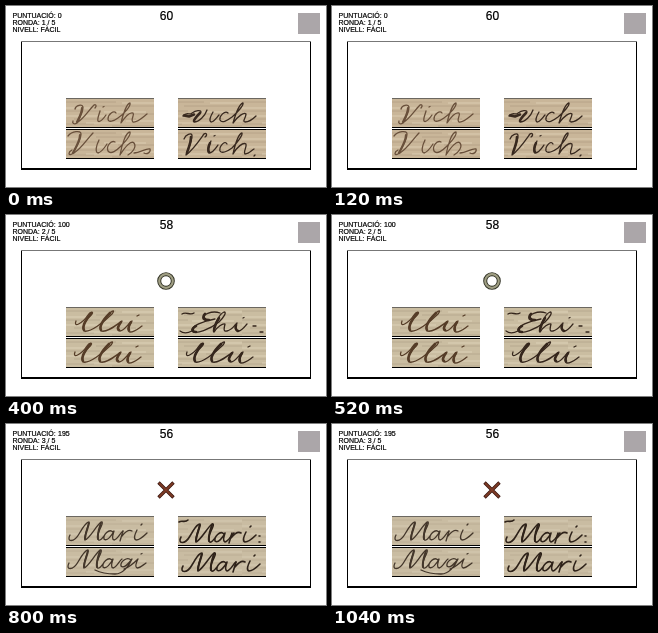
An HTML page that plays this animation: 320 by 181 pixels, repeating every 1200 ms.

```html
<!DOCTYPE html>
<html lang="ca">
<head>
<meta charset="utf-8">
<title>Joc de paraules</title>
<style>
html, body { margin: 0; width: 100%; height: 100%; overflow: hidden; background: #fff; }
svg { display: block; width: 100vw; height: 100vh; }
text { font: 7px "Liberation Sans", Arial, sans-serif; fill: #000; stroke: #000; stroke-width: .2px; }
.time text { font-size: 12px; text-anchor: middle; }
.ink { fill: none; stroke: currentColor; stroke-width: 1.3; stroke-linecap: round; stroke-linejoin: round; }
.bold { stroke-width: 2.6; }

/* --s is the starting slot; a loop has six slots of 200 ms */
.one, .two, .three { animation: one 1200ms step-end calc((var(--s) - 6) * 200ms) infinite; }
.two { animation-name: two; }
.three { animation-name: three; }
@keyframes one { 0% { visibility: visible } 16.66%, 100% { visibility: hidden } }
@keyframes two { 0% { visibility: visible } 33.33%, 100% { visibility: hidden } }
@keyframes three { 0% { visibility: visible } 50%, 100% { visibility: hidden } }
</style>
</head>
<body>
<svg viewBox="0 0 320 181" preserveAspectRatio="none">
  <defs>
    <pattern id="grain" width="88" height="31" x="60" y="93" patternUnits="userSpaceOnUse">
      <path d="M0 3H50M30 7H88M0 12H34M52 15H88M8 20H70M0 25H28M46 27H88" stroke="#6d5b42" stroke-width=".9" opacity=".22"/>
      <path d="M56 4H88M0 9H24M38 13H80M0 17H44M60 22H88M20 24H56" stroke="#fff6e2" opacity=".32"/>
    </pattern>
    <path id="cards" d="M60 93h88v28h-88zM60 124h88v28h-88zM172 93h88v28h-88zM172 124h88v28h-88z"/>
    <g id="edges" stroke="#000">
      <path d="M60 92.5h88m24 0h88" stroke="#6b6760"/>
      <path d="M60 121.5h88m24 0h88M60 123.5h88m24 0h88M60 152.5h88m24 0h88"/>
    </g>
    <g id="loops">
      <path d="M70 106C67 113 76 109 82 100C84 97 88 96 86 99C80 104 75 112 78 116C84 118 98 107 106 99C109 95 107 95 104 98C98 104 92 112 95 116C101 118 110 110 116 106C112 110 110 116 114 116C118 116 121 110 126 106C123 111 120 116 124 117C129 117 133 113 136 111M131 101l2-1"/>
      <path class="bold" d="M85 99C80 104 76 111 78 115M104 98C98 104 93 111 95 115M115 107C112 111 111 114 113 115M125 107C123 110 122 113 123 115"/>
    </g>
    <g id="ma">
      <path d="M64 111C60 118 68 119 73 110C77 103 80 98 83 98C82 104 78 111 79 116C84 114 90 102 95 98C98 97 95 103 94 105C91 111 91 117 94 116C96 115 97 113 98 112M107 108C103 104 97 111 98 115C101 118 106 111 108 107C107 111 105 115 108 116C112 115 114 109 117 107"/>
      <path d="M83 99C82 104 79 110 79 115M95 99C93 105 91 110 92 115" stroke-width="2"/>
    </g>
    <path id="ri" d="M117 107C116 110 115 114 114 117M116 112C120 107 123 105 126 107M131 106C129 110 127 115 130 116C134 116 138 112 141 109M135 101l1-1"/>
  </defs>

  <rect width="320" height="181" fill="#fff"/>
  <path d="M15 35.5H305" stroke="#777"/>
  <path d="M15.5 36V163M304.5 36V163" stroke="#000"/>
  <path d="M15 163H305" stroke="#000" stroke-width="2"/>
  <rect x="292" y="7" width="22" height="21" fill="#aba6a9"/>

  <text x="6.5" y="12">PUNTUACIÓ: <tspan class="two" style="--s:0">0</tspan></text>
  <text x="52" y="12" class="one" style="--s:2">100</text>
  <text x="52" y="12" class="one" style="--s:3">200</text>
  <text x="52" y="12" class="two" style="--s:4">195</text>
  <text x="6.5" y="19" class="two" style="--s:0">RONDA: 1 / 5</text>
  <text x="6.5" y="19" class="one" style="--s:2">RONDA: 2 / 5</text>
  <text x="6.5" y="19" class="three" style="--s:3">RONDA: 3 / 5</text>
  <text x="6.5" y="26">NIVELL: FÀCIL</text>

  <g class="time">
    <text x="160.4" y="14" class="one" style="--s:0">60</text>
    <text x="160.4" y="14" class="one" style="--s:1">59</text>
    <text x="160.4" y="14" class="one" style="--s:2">58</text>
    <text x="160.4" y="14" class="one" style="--s:3">57</text>
    <text x="160.4" y="14" class="two" style="--s:4">56</text>
  </g>

  <g class="two" style="--s:0">
    <use href="#cards" fill="#c9b699"/>
    <use href="#cards" fill="url(#grain)"/>
    <g class="ink" color="#69503b" stroke-width="1.6">
      <path d="M69 103C70 99 76 98 77 101C77 107 73 113 71 117C68 119 66 117 67 115M72 116C78 112 83 104 88 99C90 98 91 100 89 102M94 105C93 109 91 113 92 115C94 117 98 112 100 109M97 101l1-.5M110 107C108 104 102 108 102 113C102 117 108 115 112 112C118 108 125 100 124 97C121 97 117 108 115 117C119 111 124 106 127 107C129 109 124 114 127 116C131 117 136 112 141 108"/>
      <path d="M62 130C66 125 75 124 75 128C75 135 69 143 66 148C62 150 62 146 66 144M68 147C76 142 81 133 87 127M93 134C90 140 89 146 92 147C96 146 99 141 101 138M109 136C105 134 100 140 102 145C105 149 111 144 114 141C119 136 125 129 124 126C120 126 116 138 114 149C119 141 125 134 128 137C131 141 126 147 122 149M128 147C134 147 140 142 144 143C145 146 141 149 138 147"/>
      <path d="M76 102C76 107 73 112 71 116M74 129C74 135 69 143 67 147" stroke-width="2.2"/>
    </g>
    <g class="ink" color="#38291f">
      <path d="M177 110C181 105 184 110 186 107C190 104 195 104 195 106C190 112 187 114 188 116C193 116 199 110 201 104M207 106C204 111 203 115 205 116C208 116 211 111 213 109M222 107C219 104 213 110 214 114C216 118 222 114 226 111C231 107 238 99 237 97C233 98 229 110 227 117C232 110 238 106 240 108C240 112 236 115 239 116C243 116 247 113 250 110"/>
      <path class="bold" d="M178 109.5l5 1l5-2M194 107C190 111 188 114 188 115"/>
      <path d="M178 133C180 128 185 127 186 129C186 137 181 144 180 149C187 144 193 135 198 128C200 126 202 129 199 131M205 135C202 140 201 146 203 147C207 147 210 142 212 139M208 130l1-.5M221 138C219 134 213 140 214 145C216 148 222 145 226 142C231 137 237 129 236 127C232 128 229 139 227 148C231 141 237 136 240 138C241 141 237 146 239 148C243 148 246 144 248 143M249 149l-1 1"/>
      <path class="bold" d="M185 131C185 137 182 143 181 147M204 137C202 141 202 145 203 146"/>
    </g>
    <use href="#edges"/>
  </g>

  <g class="one" style="--s:2">
    <use href="#cards" fill="#cabda1"/>
    <use href="#cards" fill="url(#grain)"/>
    <g class="ink" color="#553c27">
      <use href="#loops"/>
      <use href="#loops" x="-1" y="31"/>
    </g>
    <g class="ink" color="#35261c">
      <path d="M176 99C180 96 184 101 188 98M214 98C206 95 195 100 197 104C199 107 206 105 209 104C198 106 184 111 186 116C190 120 204 114 213 107C218 102 221 97 218 97C213 99 207 112 208 117C211 112 217 108 219 109C218 113 217 117 221 116C226 115 229 110 231 108C229 112 229 117 233 116C237 115 239 111 241 109M237 103l1-.5M247 111h3M254 117h3M174 116C178 119 182 118 186 116"/>
      <path class="bold" d="M199 99C196 102 198 105 203 105M190 111C185 114 186 117 190 117M213 103C210 108 208 113 208 116M230 110C229 113 230 115 232 116"/>
      <use href="#loops" x="111" y="31"/>
    </g>
    <use href="#edges"/>
  </g>

  <g class="three" style="--s:3">
    <use href="#cards" fill="#c9bca2"/>
    <use href="#cards" fill="url(#grain)" opacity=".7"/>
    <g class="ink" color="#43362a">
      <use href="#ma"/>
      <use href="#ri"/>
      <use href="#ma" x="-1" y="28"/>
      <path d="M125 136C121 132 114 138 115 142C118 145 123 139 126 135C123 142 117 150 109 150C101 150 93 148 89 146M118 145C124 143 129 138 132 135C130 139 129 143 131 144C134 144 137 141 140 139M135 130l1-.5"/>
    </g>
    <g class="ink" color="#2e2219" style="stroke-width:1.6">
      <use href="#ma" x="111" y="2"/>
      <use href="#ri" x="109" y="2"/>
      <path d="M173 98C176 96 179 99 182 96M253 112h1M253 118h1"/>
      <use href="#ma" x="113" y="31"/>
      <use href="#ri" x="113" y="31"/>
    </g>
    <use href="#edges"/>
  </g>

  <circle class="one" style="--s:1" cx="220.5" cy="106" r="5" fill="#e2dfdb"/>

  <g class="two" style="--s:2" fill="none">
    <circle cx="160" cy="66" r="6.8" stroke="#2c2d20" stroke-width="4"/>
    <circle cx="160" cy="66" r="6.8" stroke="#a09f84" stroke-width="2.2"/>
  </g>
  <g class="two" style="--s:4" fill="none">
    <path d="M152.5 58.5L167.5 73.5M167.5 58.5L152.5 73.5" stroke="#3a1710" stroke-width="3.4"/>
    <path d="M153 59L167 73M167 59L153 73" stroke="#7d3b26" stroke-width="1.8"/>
  </g>
</svg>
</body>
</html>
```
